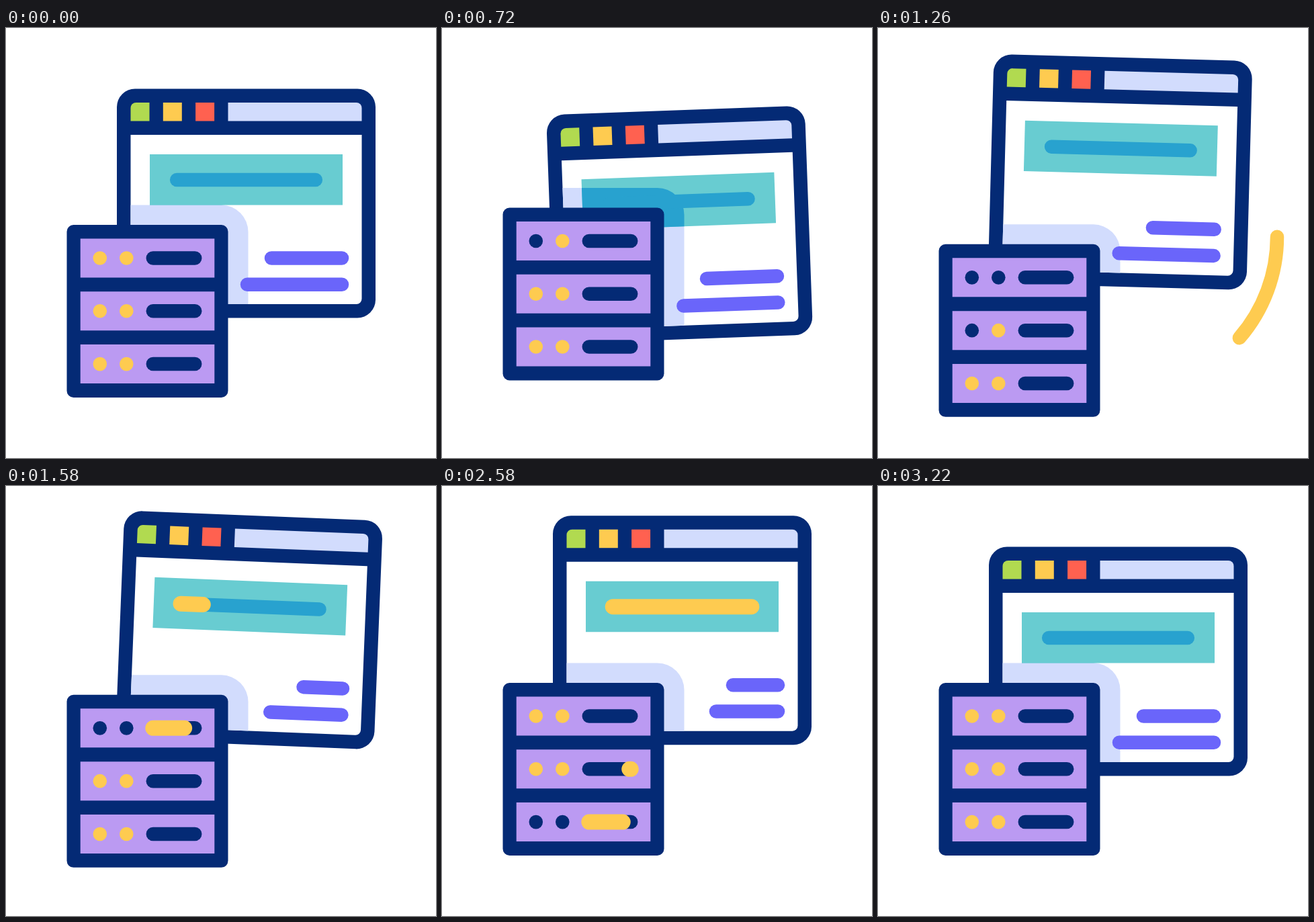
These frames come from a looping animation (640 px wide and 640 px high, 3580 ms). An HTML page with a canvas:

```html
<!DOCTYPE html>
<html lang="en">
<head>
<meta charset="utf-8">
<title>Web hosting</title>
<style>
  html, body { margin: 0; width: 100%; height: 100%; overflow: hidden; background: #fff; }
  canvas { display: block; width: 640px; height: 640px; }
</style>
</head>
<body>
<canvas id="stage" width="640" height="640"></canvas>
<script>
const ctx = document.getElementById('stage').getContext('2d');
const LOOP = 3580, STEP = 20, RAD = Math.PI / 180;
const navy = '#042a75', pale = '#d2dcfd', green = '#b1da50', gold = '#fecb50', red = '#ff6150',
      teal = '#68ccd1', blue = '#28a2cf', violet = '#6a65fa', lilac = '#bb9af2';

// Sine ease from 0 to 1 between two times.
function ease(t, from, to) {
  const u = Math.min(1, Math.max(0, (t - from) / (to - from)));
  return (1 - Math.cos(Math.PI * u)) / 2;
}

// Leaves 0, swings between +amp and -amp at the inner times, ends at 0.
function swing(t, amp, ...times) {
  let value = 0;
  for (let i = 1; i < times.length; i++) {
    const span = i === 1 || i === times.length - 1 ? amp : 2 * amp;
    value += (i % 2 ? span : -span) * ease(t, times[i - 1], times[i]);
  }
  return value;
}

// Two smooth bumps of 900 ms each.
function pulses(t, from) {
  const u = (t - from) / 900;
  return u > 0 && u < 2 ? Math.sin(Math.PI * u) ** 2 : 0;
}

const serverY = t => swing(t, -33, 260, 530, 1400, 1780);
const windowY = t => 46 * ease(t, 260, 530) - 92.3 * ease(t, 530, 1263) + 46.3 * ease(t, 2580, 3200);
const tilt = t => swing(t, -2.98, 500, 850, 1460, 2005, 2580);

function path(x0, y0, x1, y1, radii = 0) {
  ctx.beginPath();
  ctx.roundRect(x0, y0, x1 - x0, y1 - y0, radii);
}

function box(x0, y0, x1, y1, fill, radii) {
  path(x0, y0, x1, y1, radii);
  ctx.fillStyle = fill;
  ctx.fill();
}

function stroke(color, width) {
  ctx.strokeStyle = color;
  ctx.lineWidth = width;
  ctx.stroke();
}

function line(x0, x1, y, color, width = 20.5) {
  ctx.beginPath();
  ctx.moveTo(x0, y);
  ctx.lineTo(x1, y);
  stroke(color, width);
}

// A dark or blue track with a gold stretch running through it.
function meter(x0, x1, y, color, head, tail) {
  line(x0, x1, y, color);
  if (head <= 0 || tail >= 1) return;
  line(x0 + (x1 - x0) * tail, x0 + (x1 - x0) * head, y, gold, 23);
}

// The shadow moves with the server, cut to an area of the tilted window.
function shadow(t, level, color, ...area) {
  ctx.save();
  path(...area);
  ctx.clip();
  ctx.setTransform(level);
  const y = 263.5 + serverY(t);
  box(100, y, 360.5, y + 320, color, [0, 40, 0, 0]);
  ctx.restore();
}

function drawWindow(t) {
  const level = ctx.getTransform();
  ctx.save();
  ctx.translate(368, 370 + windowY(t));
  ctx.rotate(tilt(t) * RAD);
  ctx.translate(-368, -370);

  box(165, 90.5, 550, 431.5, navy, 27);
  [green, gold, red].forEach((color, i) => {
    const x = 185.5 + 48.3 * i;
    box(x, 111, x + 28, 138.5, color, i ? 0 : [8, 0, 0, 0]);
  });
  box(330.5, 111, 529.5, 138.5, pale, [0, 8, 0, 0]);

  const page = [185.5, 159, 529.5, 411], banner = [214, 188, 501, 263.5], corners = [0, 0, 8, 8];
  box(...page, '#fff', corners);
  shadow(t, level, pale, ...page, corners);
  box(...banner, teal);
  shadow(t, level, blue, ...banner);

  meter(254.2, 460.8, 226, blue, ease(t, 1302, 2360), ease(t, 2590, 3160));
  line(395 + 47 * pulses(t, 1100), 500, 342.5, violet);
  line(359 + 53 * pulses(t, 1310), 500, 381.7, violet);
  ctx.restore();
}

// One server unit: its lamps blink in turn, then both go dark while it loads.
function drawUnit(y, t) {
  const during = (from, length) => t >= from && t < from + length;
  box(110.7, y - 29, 310.3, y + 29, lilac);
  for (let i = 0; i < 2; i++) {
    const dark = during(640 + 220 * i, 220) || during(1240, 500);
    ctx.beginPath();
    ctx.arc(139.8 + 39.5 * i, y, 10.3, 0, 2 * Math.PI);
    ctx.fillStyle = dark ? navy : gold;
    ctx.fill();
  }
  meter(218.8, 281.2, y, navy, ease(t, 1280, 1730), ease(t, 1697, 2147));
}

function drawServer(t) {
  ctx.save();
  ctx.translate(0, serverY(t));
  box(90.5, 293, 330.5, 550, navy, 10);
  for (let row = 0; row < 3; row++) drawUnit(342.5 + 78.8 * row, t - 490 * row);
  ctx.restore();
}

function drawSwoosh(t) {
  const head = ease(t, 835, 1020), tail = ease(t, 1160, 1400);
  if (head <= 0 || tail >= 1) return;
  const angle = p => 65 * (1 - p) * RAD;
  ctx.beginPath();
  ctx.arc(364, 310.7, 230, angle(tail), angle(head), true);
  stroke(gold, 20.5);
}

function draw(t) {
  ctx.fillStyle = '#fff';
  ctx.fillRect(0, 0, 640, 640);
  ctx.lineCap = 'round';
  drawWindow(t);
  drawSwoosh(t);
  drawServer(t);
}

const start = performance.now();
function tick() {
  const t = (performance.now() - start) % LOOP;
  draw(Math.floor(t / STEP) * STEP);
  requestAnimationFrame(tick);
}
tick();
</script>
</body>
</html>
```
